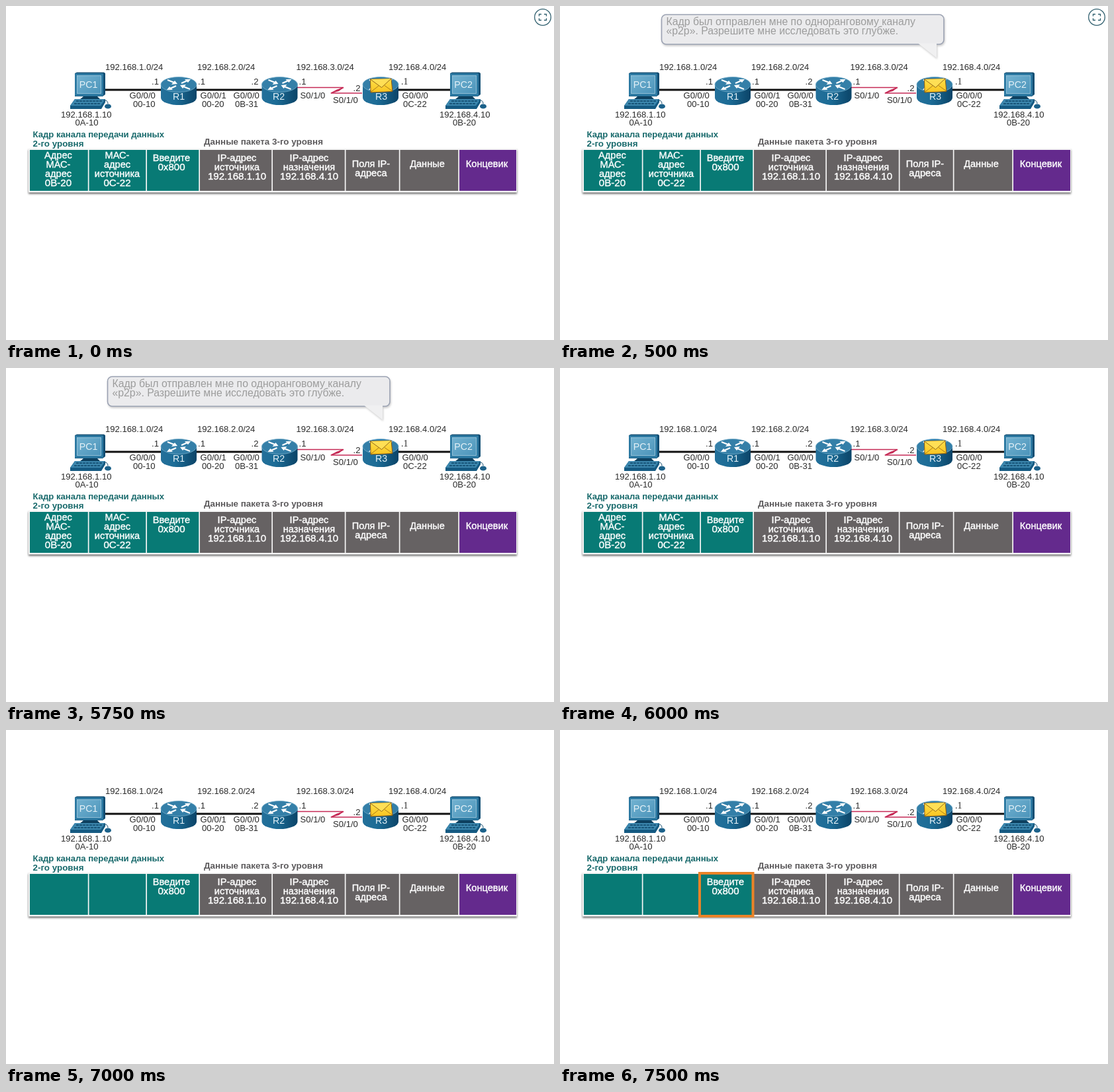
Write an HTML page that moves like this. It is 828x506 px and loops after 8 s.

```html
<!DOCTYPE html>
<html lang="ru">
<head>
<meta charset="utf-8">
<title>Кадр на маршрутизаторе R3</title>
<style>
  html, body { margin: 0; width: 100%; height: 100%; overflow: hidden; background: #fff; }
  svg { display: block; width: 828px; height: 506px; }
  text { font-family: "Liberation Sans", Arial, sans-serif; white-space: pre; }
  #labels { font-size: 13.1px; fill: #2b2b2b; }
  .title { font-size: 13.4px; font-weight: bold; }
  #cells text { font-size: 14.6px; fill: #fff; stroke: #fff; stroke-width: .4; text-anchor: middle; }
  #cells .num { font-size: 15.1px; }
  #table { filter: drop-shadow(0 2px 1.5px #0009); }
  #bubble { filter: drop-shadow(1px 2px 1.5px #0006); }
  #bubble text { font-size: 15.8px; fill: #3c3c3c; }
  .name { font-size: 14.2px; fill: #e4f1f7; text-anchor: middle; }
</style>
</head>
<body>
<svg viewBox="0 0 828 506">
  <defs>
    <linearGradient id="body">
      <stop offset="0" stop-color="#24709a"/>
      <stop offset=".4" stop-color="#1c6c96"/>
      <stop offset="1" stop-color="#0b4468"/>
    </linearGradient>
    <linearGradient id="screen" x2="1" y2="1">
      <stop offset="0" stop-color="#72b2d1"/>
      <stop offset="1" stop-color="#4c94ba"/>
    </linearGradient>
    <linearGradient id="paper" x2="0" y2="1">
      <stop offset="0" stop-color="#ffe04a"/>
      <stop offset="1" stop-color="#f8c421"/>
    </linearGradient>
    <g id="arrows">
      <path d="M-17-7L-7-3M17 7L7 3M4-2L13-6M-4 2L-13 6" stroke="#fff" stroke-width="2.2"/>
      <path d="M-2-1L-11 0L-6-6ZM2 1L11 0L6 6ZM18-8L9-8L14-3ZM-18 8L-9 8L-14 3Z" fill="#fff"/>
    </g>
    <g id="router">
      <path d="M-27 0V20A27 11 0 0 0 27 20V0Z" fill="url(#body)"/>
      <ellipse rx="27" ry="11.5" fill="#347fa8" stroke="#75adc8" stroke-width=".8"/>
      <use href="#arrows"/>
    </g>
    <g id="pc">
      <path d="M104 102L107 100.500H148L150 102V134L146 137H104Z" fill="#124e73"/>
      <rect x="104" y="102" width="43" height="34.5" rx="1.5" fill="#2d7aa3"/>
      <rect x="107.500" y="105.500" width="36" height="27" fill="url(#screen)" stroke="#a5cde0" stroke-width=".8"/>
      <path d="M117 137H138L143 142H111Z" fill="#0d405f"/>
      <path d="M104 141H150V146L144 156H97V151Z" fill="#155a82"/>
      <path d="M104 141H150L143 151H97Z" fill="#3b86ad"/>
      <path d="M106 144H145M103 148H142" stroke="#0e4769" stroke-width="1.6" stroke-dasharray="4 1"/>
      <path d="M147 143Q154 142 154 148" fill="none" stroke="#164e70"/>
      <ellipse cx="154" cy="152" rx="5" ry="3.6" fill="#1b618a"/>
    </g>
  </defs>

  <g id="expand" fill="none" stroke="#31606f" stroke-width="1.3">
    <circle cx="811" cy="17" r="12.3"/>
    <path d="M809 12.5H805.5V15.5M813 12.5H816.5V15.5M805.5 18.5V21.5H809M816.5 18.5V21.5H813"/>
  </g>

  <g fill="none">
    <path d="M149 127H236M286 127H388M592 127H672" stroke="#111" stroke-width="2.8"/>
    <path d="M440 123.5H510L491 132H538" stroke="#c52a55" stroke-width="1.6"/>
    <path d="M510 123.5L499 127L490 132.5L503 129Z" fill="#c52a55"/>
  </g>
  <use href="#pc"/>
  <use href="#pc" x="567"/>
  <use href="#router" x="261" y="119"/>
  <use href="#router" x="413.5" y="119"/>
  <use href="#router" x="566" y="119"/>
  <g stroke="#8a5a12" stroke-linejoin="round">
    <path d="M550.5 111L582 110L584 129.5L551 131Z" fill="url(#paper)"/>
    <path d="M551 130.5L563 121M584 129L572 120.5" fill="none" stroke-width=".7"/>
    <path d="M550.5 111L567.5 123.5L582 110" fill="#ffdf55" stroke-width=".9"/>
  </g>
  <g class="name">
    <text x="124.5" y="124">PC1</text>
    <text x="691" y="124">PC2</text>
    <text x="261" y="142">R1</text>
    <text x="412" y="142">R2</text>
    <text x="567" y="142">R3</text>
  </g>
  <g id="labels"></g>

  <g class="title" fill="#17696b">
    <text x="40.5" y="199" font-size="13.1" style="font-size: 13.1px">Кадр канала передачи данных</text>
    <text x="40.5" y="213">2-го уровня</text>
    <text x="299" y="209.5" fill="#5b595b">Данные пакета 3-го уровня</text>
  </g>
  <rect id="table" x="34" y="216" width="738" height="66.5" fill="#f6f6f6"/>
  <g id="cells"></g>
  <rect id="mark" x="211" y="217" width="80.5" height="65" fill="none" stroke="#ea8328" stroke-width="4"/>

  <g id="bubble">
    <rect id="balloon" x="153.5" y="13" width="426.5" height="45" rx="7" stroke="#3a4868" stroke-width="1.6"/>
    <path id="tail" d="M541 56.5H569V78.5Z"/>
    <text x="160.5" y="28.5">Кадр был отправлен мне по одноранговому каналу</text>
    <text x="160.5" y="43">«p2p». Разрешите мне исследовать это глубже.</text>
  </g>
</svg>
<script>
const $ = id => document.getElementById(id);

function add(parent, tag, attrs, content = '') {
  const node = document.createElementNS('http://www.w3.org/2000/svg', tag);
  for (const key in attrs) node.setAttribute(key, attrs[key]);
  node.textContent = content;
  return parent.appendChild(node);
}

[
  [150, 97, '192.168.1.0/24'], [289, 97, '192.168.2.0/24'],
  [438.5, 97, '192.168.3.0/24'], [578, 97, '192.168.4.0/24'],
  [220, 119, '.1'], [290, 119, '.1'], [370.5, 119, '.2'],
  [442.5, 119, '.1'], [524.5, 128.5, '.2'],
  [186.5, 140, 'G0/0/0'], [192, 153, '00-10'],
  [293.5, 140, 'G0/0/1'], [296, 153, '00-20'],
  [343.5, 140, 'G0/0/0'], [346, 153, '0B-31'],
  [444.5, 140, 'S0/1/0'], [494, 146.5, 'S0/1/0'],
  [598.5, 140, 'G0/0/0'], [600, 153, '0C-22'],
  [83, 169, '192.168.1.10'], [104.5, 181, '0A-10'],
  [655, 169, '192.168.4.10'], [675, 181, '0B-20'],
].forEach(([x, y, label]) => add($('labels'), 'text', { x, y }, label));
add($('labels'), 'text', { x: 597, y: 119, style: 'font: 14px "Liberation Serif", serif' }, '.1');

// Each cell: left edge, text centre, first baseline, fill, lines.
const teal = '#087a75', grey = '#666263', purple = '#642a8d';
const cells = [
  [36, 79, 231, teal, 'Адрес|МАС-|адрес|0B-20'],
  [125.5, 168, 231, teal, 'МАС-|адрес|источника|0С-22'],
  [213, 250, 235, teal, 'Введите|0x800'],
  [293, 349, 234.5, grey, 'IP-адрес|источника|192.168.1.10'],
  [403, 458, 234.5, grey, 'IP-адрес|назначения|192.168.4.10'],
  [513.5, 551.5, 244, grey, 'Поля IP-|адреса'],
  [595.5, 636.5, 244, grey, 'Данные'],
  [685, 726.5, 244, purple, 'Концевик'],
];
const texts = cells.map(([left, x, top, fill, lines], i) => {
  const right = i < 7 ? cells[i + 1][0] - 1.7 : 771;
  add($('cells'), 'rect', { x: left, y: 218, width: right - left, height: 62, fill });
  const group = add($('cells'), 'g', {});
  lines.split('|').forEach((line, row) =>
    add(group, 'text', { x, y: top + 14 * row, class: /^\d/.test(line) ? 'num' : '' }, line));
  return group;
});

const LOOP = 8000;
// Value of the last [time, value] step reached.
const at = (t, steps) => steps.filter(([start]) => start <= t).pop()[1];

function draw(now) {
  const t = now % LOOP;
  const bubble = at(t, [[0, 0], [500, .5], [750, 1], [5750, .5], [6000, 0]]);
  $('bubble').style.opacity = bubble;
  $('balloon').setAttribute('fill', bubble < 1 ? '#d8d9dd' : '#fff');
  $('tail').setAttribute('fill', bubble < 1 ? '#e2e2e4' : '#fff');
  $('expand').style.opacity = t < 750 ? 1 : 0;
  const address = at(t, [[0, 1], [6500, .67], [6750, .33], [7000, 0]]);
  texts[0].style.opacity = texts[1].style.opacity = address;
  $('mark').style.opacity = t < 7500 ? 0 : 1;
}

const begin = performance.now();
function tick() {
  draw(performance.now() - begin);
  requestAnimationFrame(tick);
}
tick();
</script>
</body>
</html>
```
